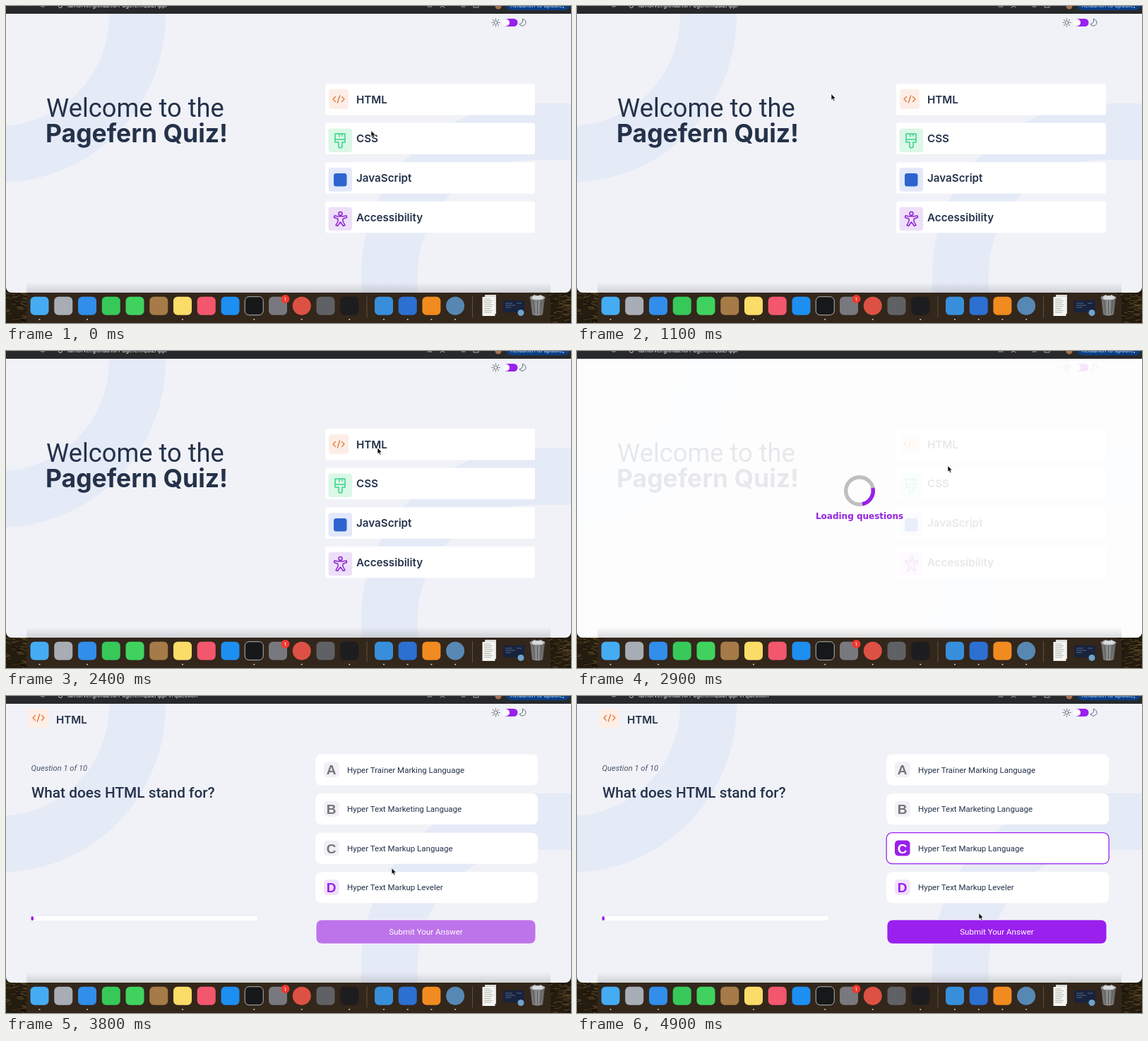
Write an HTML page that moves like this. It is 800 px wide and 449 px high and loops after 5 s.

```html
<!DOCTYPE html>
<html lang="en">
<head>
<meta charset="utf-8">
<title>Pagefern Quiz</title>
<style>
  html, body { margin: 0; width: 100%; height: 100%; overflow: hidden; background: #20190f; }
  svg { display: block; width: 100vw; height: 100vh; }
  text { font-family: Roboto, sans-serif; fill: #24324a; white-space: pre; }
  .name { font: 600 15.2px Inter, sans-serif; }
  .thin { font-size: 36.3px; font-weight: 400; }
  .bold { font: 700 35.5px Inter, sans-serif; }
  .count { font-size: 11.2px; font-style: italic; fill: #4a556b; }
  .ask { font-size: 20.8px; font-weight: 500; }
  .option { font-size: 11.5px; }
  .letter { font: bold 19px "Liberation Sans", Arial, sans-serif; text-anchor: middle; }
  .send { font-size: 11.6px; fill: #fff; text-anchor: middle; }
  .wait { font: bold 12px "DejaVu Sans", sans-serif; fill: #9326e0; text-anchor: middle; }
  .bar { font-size: 8.6px; fill: #e3e4e8; }
  .line { fill: none; stroke-linecap: round; stroke-linejoin: round; }
</style>
</head>
<body>
<svg viewBox="0 0 800 449" preserveAspectRatio="none">
  <defs>
    <linearGradient id="shade" x2="0" y2="1">
      <stop offset="0" stop-color="#555" stop-opacity="0"/>
      <stop offset="1" stop-color="#555" stop-opacity=".2"/>
    </linearGradient>
    <linearGradient id="metal">
      <stop offset="0" stop-color="#6f7275"/>
      <stop offset=".5" stop-color="#aeb1b3"/>
      <stop offset="1" stop-color="#66696c"/>
    </linearGradient>
    <clipPath id="window"><path d="M0 11H800V398a8 8 0 0 1-8 8H8a8 8 0 0 1-8-8Z"/></clipPath>
    <g id="code" class="line" stroke="#e5793c" stroke-width="1.4">
      <path d="M-4.500-3.500L-8 0l3.500 3.500M4.500-3.500L8 0 4.500 3.500M1.600-5L-1.600 5"/>
    </g>
  </defs>

  <rect width="800" height="449" fill="#241c0f"/>
  <g id="grass" stroke-width="1"></g>

  <g id="browser">
    <rect width="800" height="12" fill="#28292b"/>
    <g class="line" stroke="#aeb0b4" stroke-width="1">
      <path d="M11-2l2 2M30-2l2 2M49 0a4 4 0 0 0 6 0M597 1h6M645 1h5M662-2v4h7v-4"/>
      <path d="M615 2l3-2 3 2"/>
    </g>
    <circle cx="77" cy="0" r="2.500" fill="none" stroke="#c8cace"/>
    <text id="url" class="bar" x="87" y="2"></text>
    <circle cx="697" cy="0" r="4.500" fill="#a9714f"/>
    <rect x="708" y="-10" width="90" height="16" rx="8" fill="#0b3f85"/>
    <text class="bar" x="714" y="2" style="fill:#b9d6fb">Relaunch to update</text>
    <circle cx="789" cy="2" r=".9" fill="#b9d6fb"/>
  </g>

  <g clip-path="url(#window)">
    <rect y="11" width="800" height="395" fill="#f0f2f7"/>
    <g fill="none" stroke="#e5eaf7" stroke-width="80">
      <circle cx="-10" cy="14" r="196"/>
      <path d="M543 410V380A202 202 0 0 1 745 178H805"/>
    </g>

    <g class="line" stroke="#5c6679" stroke-width="1">
      <circle cx="693.500" cy="23.500" r="2.600"/>
      <g id="rays"></g>
      <path d="M731.500 18.500a4.800 4.800 0 1 1-4.500 7.200a5.300 5.300 0 0 0 4.500-7.200Z"/>
    </g>
    <rect x="704" y="18" width="20.500" height="11" rx="5.500" fill="#9a20ee"/>
    <circle cx="708" cy="23.500" r="5" fill="#fff"/>

    <g id="home">
      <text class="thin" x="57" y="157">Welcome to the</text>
      <text class="bold" x="56" y="192.500">Pagefern Quiz!</text>
    </g>

    <g id="quiz">
      <rect x="32" y="18" width="28" height="27" rx="3" fill="#fdeee6"/>
      <use href="#code" x="46" y="31"/>
      <text class="name" x="71" y="39">HTML</text>
      <text class="count" x="35.500" y="105.500">Question 1 of 10</text>
      <text class="ask" x="36" y="143.500">What does HTML stand for?</text>
      <rect x="35.500" y="312" width="320.500" height="6" rx="3" fill="#fff"/>
      <rect x="35.500" y="312" width="3.500" height="6" rx="1.750" fill="#9a20ee"/>
      <rect id="send" x="439" y="317" width="311" height="34" rx="8" stroke="#fff" stroke-opacity=".8"/>
      <text class="send" x="594.500" y="338">Submit Your Answer</text>
    </g>

    <g id="loading">
      <rect y="11" width="800" height="395" fill="#fff" opacity=".89"/>
      <circle cx="400" cy="198" r="19.300" fill="none" stroke="#bfbfc1" stroke-width="5.400"/>
      <path id="spin" d="M413.650 184.350A19.300 19.300 0 0 1 413.650 211.650" fill="none" stroke="#9a20ee" stroke-width="5.400"/>
      <text class="wait" x="400" y="238.300">Loading questions</text>
    </g>

    <rect x="29" y="391" width="742" height="15" fill="url(#shade)"/>
  </g>

  <g id="dock">
    <rect x="29" y="406" width="742" height="50" rx="10" fill="#33261b"/>
    <path d="M511 411V441M660.500 411V441" stroke="#5d5044"/>
    <g id="apps"></g>
    <circle cx="395.500" cy="415" r="6" fill="#f0392f"/>
    <text x="395.500" y="418" font-size="8" text-anchor="middle" style="fill:#fff">1</text>

    <rect x="678" y="409" width="16" height="27" fill="#dcdcda"/>
    <rect x="674.500" y="412" width="18" height="27" fill="#f5f5f2"/>
    <g id="print" stroke="#a3a3a0" stroke-width=".8"></g>

    <rect x="704" y="417" width="30" height="17" fill="#18233d"/>
    <path d="M707 421h10M707 424h14M707 427h8M723 421h7" stroke="#53698f"/>
    <circle cx="729" cy="434.500" r="4.500" fill="#6fa3cc"/>

    <path d="M742 413h21l-3 24q-7.500 3-15 0Z" fill="url(#metal)" opacity=".8"/>
    <path d="M747 417l1.500 19M752.500 417v20M758 417l-1.500 19" stroke="#515457"/>
    <path d="M744 413l4-4 5 2 4-2 5 4-4 3-11 0Z" fill="#d9dbdc"/>
    <ellipse cx="752.500" cy="413" rx="10.500" ry="2.600" fill="none" stroke="#c4c7c9"/>
  </g>

  <g id="cursor" stroke-linejoin="round">
    <path id="arrow" d="M0 0V8.800L2 7l1.500 3.200 1.500-.7L3.600 6.400H6.300Z" fill="#000" stroke="#fff" stroke-width=".7"/>
    <path id="hand" d="M-1 .8Q0-.6 1 .8V4l4 .8Q6 5 5.600 7L5 10H-.6L-3.200 6.200Q-3 4.600-1 6Z" fill="#fff" stroke="#111" stroke-width=".9"/>
  </g>
</svg>

<script>
const LOOP = 5000, STEP = 100;
const LOAD = 2600, QUIZ = 3100, PICK = 4500;
const PURPLE = '#9a20ee';
const $ = id => document.getElementById(id);

function add(parent, tag, attrs, text) {
  const el = document.createElementNS('http://www.w3.org/2000/svg', tag);
  for (const key in attrs) el.setAttribute(key, attrs[key]);
  if (text) el.textContent = text;
  return parent.appendChild(el);
}
const box = (parent, x, y, width, height, rx, fill) =>
  add(parent, 'rect', { x, y, width, height, rx, fill });
const show = (id, on) => { $(id).style.display = on ? '' : 'none'; };

// Topic list
const topics = [
  ['HTML', '#fceee7'], ['CSS', '#dbf7e7'], ['JavaScript', '#e3e8fa'], ['Accessibility', '#eedff9']
];
topics.forEach(([name, tint], i) => {
  const y = 110 + i * 55.6, small = i === 0;
  box($('home'), 452, y, 297, 44.5, 3, '#fff');
  box($('home'), small ? 457 : 456.5, y + 8, small ? 28 : 33.5, small ? 28 : 33.5, 4, tint);
  add($('home'), 'text', { class: 'name', x: 496, y: y + 27.8 }, name);
});
add($('home'), 'use', { href: '#code', x: 471, y: 132 });
const icon = (x, y, stroke, d) => add($('home'), 'path', {
  class: 'line', transform: `translate(${x} ${y})`, stroke, 'stroke-width': 1.5, d
});
icon(473, 190, '#35d487', 'M-7-9H7V3H3V8.500a2.500 2.500 0 0 1-5 0V3H-7ZM-7-1H7M-1-9v4M3-9v3');
box($('home'), 464, 237, 18.5, 18.5, 3.5, '#2d64d0');
icon(473.5, 301.5, '#8e24d4',
  'M-2.500-7.500a2.500 2.500 0 1 0 5 0a2.500 2.500 0 1 0-5 0M-8.500-4.500L-3-3.500H3L8.500-4.500 9-2 3.500 0V3.500L6.500 9 4 10 0 4.500-4 10-6.500 9-3.500 3.500V0L-9-2Z');

// Answers
const options = ['Hyper Trainer Marking Language', 'Hyper Text Marketing Language',
  'Hyper Text Markup Language', 'Hyper Text Markup Leveler'];
const answers = options.map((label, i) => {
  const y = 82.5 + i * 55.6;
  const card = box($('quiz'), 438.2, y, 315, 44, 8, '#fff');
  const tile = box($('quiz'), 450, y + 10.8, 21.5, 22, 5, '#f2f0f5');
  const letter = add($('quiz'), 'text', { class: 'letter', x: 460.7, y: y + 28.8 }, 'ABCD'[i]);
  add($('quiz'), 'text', { class: 'option', x: 483, y: y + 26 }, label);
  return { y, card, tile, letter };
});

// Sun rays, page lines, grass
for (let i = 0; i < 8; i++) {
  add($('rays'), 'path', { d: 'M693.5 19v-1.200', transform: `rotate(${i * 45} 693.5 23.5)` });
}
for (let i = 0; i < 8; i++) add($('print'), 'path', { d: `M677 ${415 + i * 2.7}h${9 + i * 3 % 5}` });
let seed = 7;
const rand = () => (seed = seed * 16807 % 2147483647) / 2147483647;
for (let i = 0; i < 150; i++) {
  const x = (i % 2 ? 768 : -4) + rand() * 34, y = 404 + rand() * 45;
  add($('grass'), 'path', {
    d: `M${x} ${y}l${3 + rand() * 7} ${rand() * 4 - 2}`,
    stroke: ['#4d3b1b', '#65502a', '#151008'][i % 3]
  });
}

// Dock: colour, running dot, round
const apps = [
  ['#45acf3', 1], ['#a8adb5'], ['#318eea', 1], ['#36c95a'], ['#40d25f'], ['#a67b47'],
  ['#fbdc68', 1], ['#f2576d'], ['#1d8ff1'], ['#17181a', 1], ['#77797e'], ['#dd5144', 1, 1],
  ['#606164'], ['#1d1d1f', 1], ['#378fdb', 1], ['#2c70d2', 1], ['#f18b20', 1], ['#5788b3', 1, 1]
];
apps.forEach(([fill, running, round], i) => {
  const x = i < 14 ? 47.5 + i * 33.75 : 535 + (i - 14) * 33.7;
  const tile = box($('apps'), x - 13, 411.7, 26, 26, round ? 13 : 6, fill);
  if (i === 9) tile.setAttribute('stroke', '#b4b4b4');
  if (running) add($('apps'), 'circle', { cx: x, cy: 444, r: 1.1, fill: '#d0c3b2' });
});

// Pointer path: time, x, y
const path = [
  [0, 517, 176.5], [400, 517, 176.5], [1000, 360, 124.5], [1200, 360, 124.5],
  [1900, 522, 173.5], [2300, 526, 137], [2600, 526, 137], [2900, 525, 162.5],
  [3100, 526, 299], [3200, 526.5, 300], [3400, 526.5, 300], [4000, 553, 224],
  [4300, 556.5, 218], [4550, 556.5, 218], [4900, 569, 307.5], [5000, 569, 307.5]
];
function pointer(t) {
  const i = path.findIndex(p => p[0] > t);
  const [t0, x0, y0] = path[i - 1], [t1, x1, y1] = path[i];
  const p = (t - t0) / (t1 - t0), e = p * p * (3 - 2 * p);
  return [x0 + (x1 - x0) * e, y0 + (y1 - y0) * e];
}
function hovered(t) {
  if (t < QUIZ) return -1;
  const y = pointer(t)[1];
  return answers.findIndex(a => y > a.y && y < a.y + 44);
}

function draw(t) {
  const quiz = t >= QUIZ, picked = t >= PICK;
  show('home', !quiz);
  show('quiz', quiz);
  show('loading', t >= LOAD && !quiz);
  $('url').textContent = 'lumorvel.github.io/PagefernQuizApp/' + (quiz ? '#/question' : '');
  $('spin').setAttribute('transform', `rotate(${33 + (t - 2900) * .36} 400 198)`);
  $('send').setAttribute('fill', picked ? PURPLE : '#bd74ea');

  // The highlight lingers one step after the pointer leaves
  const over = hovered(t), last = hovered(t - STEP);
  answers.forEach(({ card, tile, letter }, i) => {
    const chosen = picked && i === 2, lit = i === over || i === last;
    card.setAttribute('stroke', chosen ? PURPLE : 'none');
    card.setAttribute('stroke-width', 1.3);
    tile.setAttribute('fill', chosen ? PURPLE : lit ? '#f1e2fb' : '#f2f0f5');
    letter.style.fill = chosen ? '#fff' : lit ? PURPLE : '#77777b';
  });

  const [x, y] = pointer(t);
  $('cursor').setAttribute('transform', `translate(${x} ${y})`);
  show('hand', over >= 0);
  show('arrow', over < 0);
}

const start = performance.now();
function tick() {
  const t = Math.max(0, performance.now() - start) % LOOP;
  draw(Math.floor(t / STEP) * STEP);
  requestAnimationFrame(tick);
}
tick();
</script>
</body>
</html>
```
